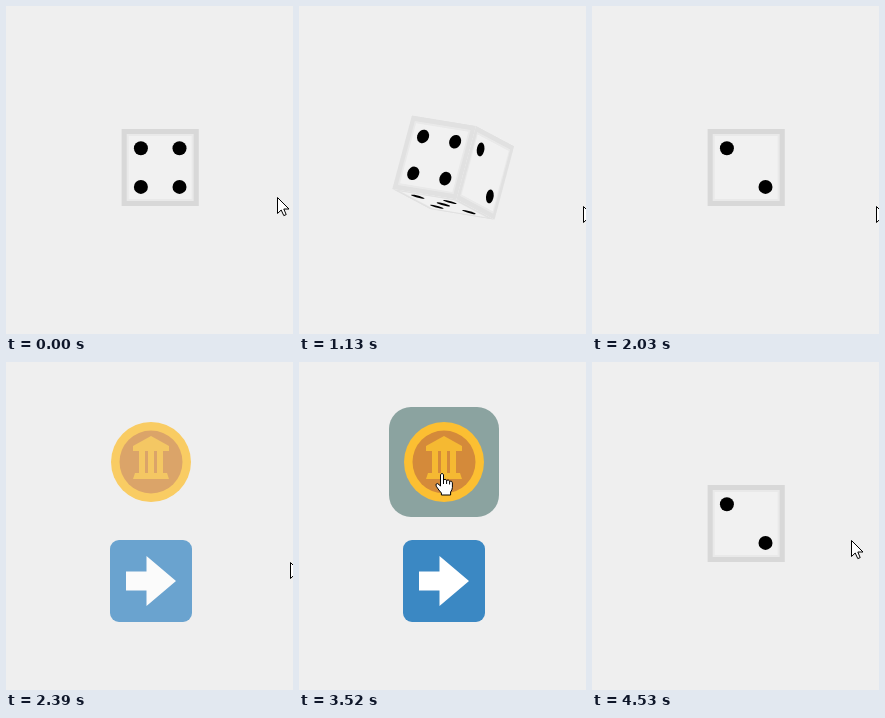
Write an HTML page with a canvas that moves like this. It is 287 by 328 pixels and loops after 4.89 s.

```html
<!DOCTYPE html>
<html lang="en">
<head>
<meta charset="utf-8">
<title>Dice roll</title>
<style>
html, body { margin: 0; width: 100%; height: 100%; overflow: hidden; background: #efefef; }
canvas { display: block; }
</style>
</head>
<body>
<canvas id="stage" width="287" height="328"></canvas>
<script>
const ctx = document.getElementById('stage').getContext('2d');
const LOOP = 4890, STEP = 125.4; // ms; all times below count steps
const BACKGROUND = '#efefef';

const ramp = (k, from, to) => Math.min(1, Math.max(0, (k - from) / (to - from)));
const ease = u => u * u * (3 - 2 * u);

// Each move is [from, to, target values]
const follow = (k, start, moves) => moves.reduce((now, [from, to, target]) =>
  now.map((v, i) => v + (target[i] - v) * ramp(k, from, to)), start);

const cursorAt = k => follow(k, [271, 191], [
  [1, 3, [177, 174]],
  [4, 7, [284, 200]],
  [22, 28, [143, 111]],
  [32, 36, [259, 178]]
]);

const spinAt = k => follow(k, [-360, -360, -360], [
  [4, 9, [17.5, -29.6, 17]],
  [9, 13, [316, 177.5, 235]],
  [13, 16, [360, 270, 360]]
]);

function disc(x, y, r, color) {
  ctx.fillStyle = color;
  ctx.beginPath();
  ctx.arc(x, y, r, 0, 7);
  ctx.fill();
}

function box(x, y, w, h, r, color) {
  ctx.fillStyle = color;
  ctx.beginPath();
  ctx.roundRect(x, y, w, h, r);
  ctx.fill();
}

function shape(path, color) {
  ctx.fillStyle = color;
  ctx.fill(new Path2D(path));
}

// Covers the stage with background; a partial cover fades what is drawn
function veil(alpha) {
  ctx.globalAlpha = alpha;
  box(0, 0, 287, 328, 0, BACKGROUND);
  ctx.globalAlpha = 1;
}

const SIZE = 77, HALF = SIZE / 2, CENTER = [154.2, 161.6];
// Pip count, then the turns about x and y that bring the front to that face
const FACES = [[4, 0, 0], [3, 0, 180], [2, 0, 90], [6, 0, -90], [5, -90, 0], [1, 90, 0]];

function turn([x, y, z], [a, b, c]) {
  const rot = (p, q, deg) => {
    const r = deg * Math.PI / 180, s = Math.sin(r), k = Math.cos(r);
    return [p * k - q * s, p * s + q * k];
  };
  [x, y] = rot(x, y, c);
  [z, x] = rot(z, x, b);
  [y, z] = rot(y, z, a);
  return [x, y, z];
}

function drawPips(count) {
  const pair = (x, y) => [-19.3, 19.3].forEach(d => disc(x * d, y * d, 7, '#000'));
  if (count > 1) pair(1, 1);
  if (count > 3) pair(1, -1);
  if (count === 6) pair(1, 0);
  if (count % 2) disc(0, 0, 7, '#000');
}

function drawEdge(width, color) {
  ctx.strokeStyle = color;
  ctx.lineWidth = width;
  ctx.strokeRect(width / 2 - HALF, width / 2 - HALF, SIZE - width, SIZE - width);
}

function drawDie(angles) {
  const flat = angles.every(a => a % 90 === 0);
  for (const [count, rx, ry] of FACES) {
    const axis = (...v) => turn(turn(v, [rx, ry, 0]), angles);
    const u = axis(1, 0, 0), v = axis(0, 1, 0), n = axis(0, 0, 1);
    if (n[2] < 0.01) continue;
    ctx.save();
    ctx.transform(u[0], u[1], v[0], v[1], CENTER[0] + n[0] * HALF, CENTER[1] + n[1] * HALF);
    box(-HALF, -HALF, SIZE, SIZE, 0, '#f1f1f1');
    drawEdge(7, '#e9e9e9');
    drawEdge(5, flat ? '#d8d8d8' : '#e1e1e1');
    drawPips(count);
    ctx.restore();
  }
}

function drawMenu(hover) {
  ctx.globalAlpha = hover;
  box(90, 45, 110, 110, 22, '#8ba3a0');
  ctx.globalAlpha = 1;
  disc(145, 100, 40, '#fcbf32');
  disc(145, 100, 31.5, '#d48a3a');
  shape('M145 74L163 84V89H127V84ZM133 89h6v23h-6zM142 89h6v23h-6zM151 89h6v23h-6zM129 111H161L163 117H127Z', '#f5b932');
  box(104, 178, 82, 82, 9, '#3b88c3');
  shape('M120 209.5H140.5V194L170 219L140.5 244V228.5H120Z', '#fff');
}

const ARROW = new Path2D('M.5 .5V16.5L4.2 13L6.8 18.6L9.2 17.6L6.8 12H12Z');
const HAND = new Path2D('M-1.5 13V1.5Q0 -.8 1.5 1.5V7Q3.2 5.3 4.6 7.4Q6.4 6.2 7.6 8.2Q10 7.4 10.4 9.8V14.5Q10.2 17 8.6 19V22H-.6V20Q-3 17.5 -5.8 13.2Q-7 10.5 -4.3 10.6Z');
const KNUCKLES = new Path2D('M1.5 6V11M4.6 7.4V11M7.6 8.2V11.5');

function drawCursor(x, y, hand) {
  const path = hand ? HAND : ARROW;
  ctx.save();
  ctx.translate(Math.round(x), Math.round(y));
  ctx.fillStyle = '#fff';
  ctx.strokeStyle = '#000';
  ctx.lineWidth = 1;
  ctx.lineJoin = 'round';
  ctx.fill(path);
  ctx.stroke(path);
  if (hand) ctx.stroke(KNUCKLES);
  ctx.restore();
}

function draw(k) {
  const menu = ease(ramp(k, 17, 20)) * (1 - ramp(k, 32, 35));
  const [x, y] = cursorAt(k);
  veil(1);

  if (menu > 0) {
    drawMenu(ramp(k, 25, 28));
    veil(1 - menu);
  } else {
    drawDie(spinAt(k));
    if (k > 32) veil(1 - ramp(k, 32, 36));
  }

  if (k === 4 || k === 32) disc(x - 3, y - 2, 15.5, 'rgba(255,246,25,.52)');
  const [left, top, side] = menu > 0 ? [90, 45, 110] : [116, 123, 78];
  drawCursor(x, y, x > left && x < left + side && y > top && y < top + side);
}

const start = performance.now();
function tick() {
  const t = (performance.now() - start) % LOOP;
  draw(Math.floor((t + 3) / STEP));
  requestAnimationFrame(tick);
}
tick();
</script>
</body>
</html>
```
